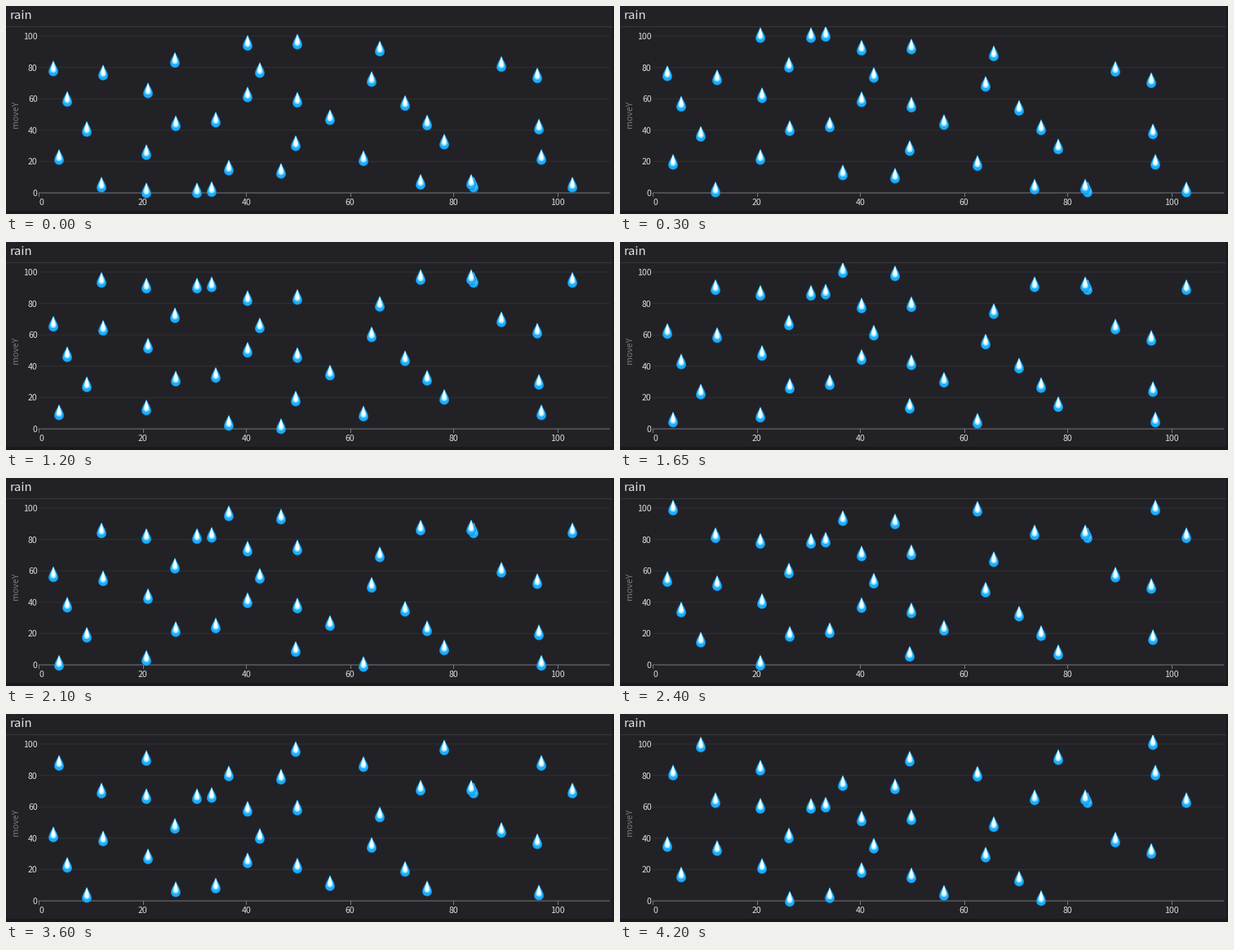
A matplotlib script that plays this animation: 745x256 px, repeating every 4220 ms.

```python
import numpy as np
import matplotlib.pyplot as plt
from matplotlib.animation import FuncAnimation
from matplotlib.collections import PathCollection
from matplotlib.patches import Rectangle
from matplotlib.path import Path
from matplotlib.transforms import IdentityTransform

W, H, DPI = 745, 256, 100
LOOP, INTERVAL, STEP = 4220, 20, 150
FALL = 2.97                  # pixels per step
TOP, SPAN = 34, 197          # a drop leaving the bottom re-enters at TOP

# starting point of each drop, in pixels
DROPS = np.array([
    (58, 77), (65, 186), (75, 114.5), (99, 151.5), (117, 220), (119, 82),
    (172, 180), (172, 227), (174, 104), (207, 66.5), (208, 144.5), (234, 227),
    (252, 225.5), (257, 140), (273, 199), (296, 45.5), (296, 109), (311, 79),
    (337, 203), (355, 169), (357, 44), (357, 115.5), (397, 137), (438, 187.5),
    (448, 90), (458, 52.5), (489, 119.5), (508, 216.5), (516, 143.5),
    (537, 167), (573, 220), (570, 216.5), (607, 71.5), (651, 85.5),
    (653, 148.5), (656, 186), (694, 220),
])

fig = plt.figure(figsize=(W / DPI, H / DPI), dpi=DPI, facecolor="#222226")
ax = fig.add_axes([0, 0, 1, 1])
ax.set(xlim=(0, W), ylim=(H, 0))
ax.axis("off")


def rect(x, y, w, h, color):
    ax.add_patch(Rectangle((x, y), w, h, fc=color, ec="none", lw=0,
                           snap=False))


def label(x, y, text, size, color="#dcdddf", **kw):
    ax.text(x, y, text, fontsize=size * 72 / DPI, color=color,
            family="Noto Sans CJK JP", **kw)


def teardrop(top, widest, half, bottom):
    """Pointed top, nearly straight flanks, round bulb."""
    flank, bulb = top - widest, widest - bottom
    right = [(half * 0.3, top - flank * 0.3), (half, widest + flank * 0.3),
             (half, widest), (half, widest - bulb * 0.55),
             (half * 0.55, bottom)]
    left = [(-x, y) for x, y in reversed(right)]
    verts = [(0, top)] + right + [(0, bottom)] + left + [(0, top)]
    return Path(verts, [Path.MOVETO] + [Path.CURVE4] * 12)


# panel
rect(0, 25, 743, 1, "#38383c")
rect(0, 252, W, 4, "#1b191e")
rect(743, 0, 2, H, "#1b191e")
label(5, 16, "rain", 15)
label(12, 133.5, "moveY", 10.7, "#7a7a7e", rotation=90,
      ha="center", va="center")

# axes
for i in range(6):
    x, y = 40.5 + 127 * i, 230 - 38.6 * i
    rect(40, y - 0.5, 700, 1, "#313135" if i else "#78787c")
    rect(round(x), 230, 1, 5, "#78787c")
    label(38.7, y + 3.9, str(20 * i), 10.5, ha="right")
    label(x if i else 43, 245.2, str(20 * i), 10.5, ha="center")

# each drop is a stack of nested teardrops
layers = [
    (teardrop(10.2, -3.8, 6, -9.6), "#1583d0"),
    (teardrop(9.4, -3.9, 5.2, -8.8), "#1eaefb"),
    (teardrop(9.2, -2, 3.5, -5), "#9fe8ff"),
    (teardrop(8.8, -1, 2.2, -3), "#f6feff"),
]
shapes, colors = zip(*layers)
rain = PathCollection(shapes, facecolors=colors, edgecolors="none",
                      offsets=np.zeros((1, 2)), offset_transform=ax.transData,
                      transform=IdentityTransform(), zorder=5)
ax.add_collection(rain, autolim=False)
rain.set_clip_path(Rectangle((0, 26), W, H - 26, transform=ax.transData))


def draw(i):
    step = (i * INTERVAL + INTERVAL // 2) // STEP
    points = DROPS.copy()
    points[:, 1] = TOP + (DROPS[:, 1] + FALL * step - TOP) % SPAN
    rain.set_offsets(np.repeat(points, len(layers), axis=0))
    return [rain]


anim = FuncAnimation(fig, draw, frames=LOOP // INTERVAL, interval=INTERVAL,
                     repeat=True, repeat_delay=0)
plt.show()
```
